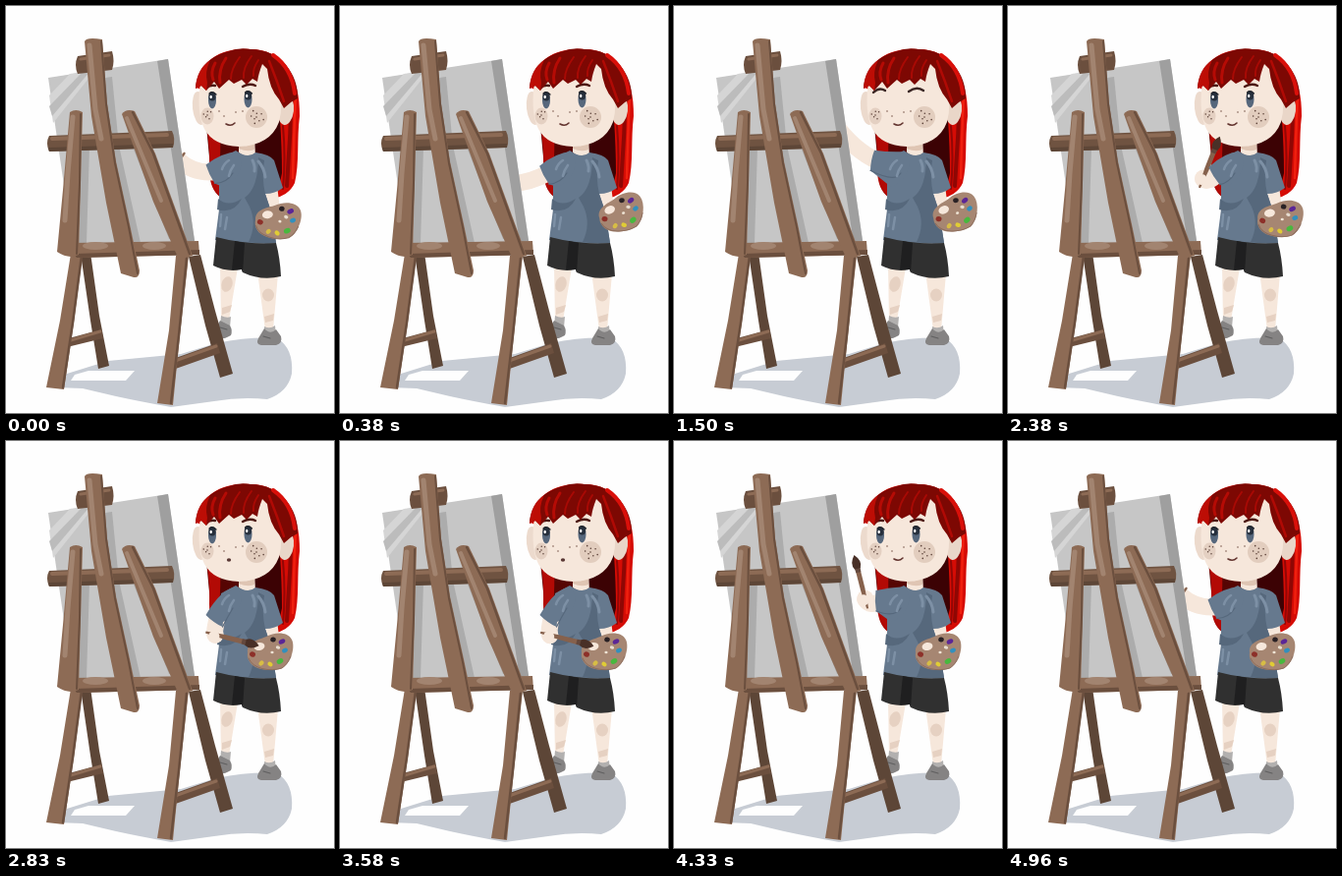
Recreate the animation shown at these times as an HTML page with a canvas. Size 334x414 px, loop 5 s.

```html
<!DOCTYPE html>
<html lang="en">
<head>
<meta charset="utf-8">
<title>Painter at the easel</title>
<style>
html, body { margin: 0; width: 100%; height: 100%; overflow: hidden; background: #fefefe; }
canvas { display: block; width: 334px; height: 414px; }
</style>
</head>
<body>
<canvas id="stage" width="334" height="414"></canvas>
<script>
const ctx = document.getElementById('stage').getContext('2d');
const LOOP = 5000, STEP = 1000 / 24, RAD = Math.PI / 180;
const PAPER = '#fefefe', SKIN = '#f6e7db', BLUSH = '#e6d1c2';
const SHIRT = '#66798e', FOLD = '#56687c', SHEEN = '#7d90a5';
const WOOD = '#8d6b55', BARK = '#6b4f3e', DARK = '#5d4637', GLOW = '#a28470', INK = '#3b2624';

function fill(color, d) {
  ctx.fillStyle = color;
  ctx.fill(new Path2D(d));
}

function line(color, width, d) {
  ctx.strokeStyle = color;
  ctx.lineWidth = width;
  ctx.lineCap = ctx.lineJoin = 'round';
  ctx.stroke(new Path2D(d));
}

function oval(color, x, y, rx, ry = rx, turn = 0) {
  ctx.fillStyle = color;
  ctx.beginPath();
  ctx.ellipse(x, y, rx, ry, turn, 0, 7);
  ctx.fill();
}

// Slope of value n at key i: smooth through a sweep, flat at turns and holds.
function slope(keys, i, n) {
  if (!keys[i - 1] || !keys[i + 1]) return 0;
  const rate = j => (keys[j + 1][n] - keys[j][n]) / (keys[j + 1][0] - keys[j][0]);
  const before = rate(i - 1), after = rate(i);
  return before * after <= 0 ? 0 : 2 * before * after / (before + after);
}

// Pose on a cubic through the keys; each key is [time, ...values].
function pose(keys, t) {
  const i = keys.findIndex(k => k[0] > t) - 1;
  if (i < 0) return keys[keys.length - 1].slice(1);
  const a = keys[i], b = keys[i + 1], span = b[0] - a[0];
  const u = (t - a[0]) / span, v = 1 - u;
  return a.slice(1).map((_, j) => {
    const n = j + 1;
    return v * v * (1 + 2 * u) * a[n] + u * u * (3 - 2 * u) * b[n]
      + span * u * v * (v * slope(keys, i, n) - u * slope(keys, i + 1, n));
  });
}

// cuff x, y, hand x, y, brush angle
const armKeys = [
  [0, 208, 171, 176, 157, -232],
  [380, 208, 172, 169, 180, -185],
  [620, 210, 174, 171, 186, -180],
  [1080, 202, 158, 165, 128, -180],
  [1500, 202, 157, 163, 119, -180],
  [1630, 202, 157, 163, 118, -180],
  [2040, 202, 157, 163, 118, -180],
  [2210, 204, 163, 177, 148, -120],
  [2380, 210, 173, 199, 176, -67],
  [2560, 211, 178, 208, 186, -30],
  [2790, 212, 183, 213, 197, 14],
  [3670, 212, 183, 213, 197, 14],
  [3900, 212, 180, 211, 189, -25],
  [4170, 210, 173, 203, 174, -80],
  [4330, 205, 161, 192, 159, -113],
  [4630, 206, 167, 174, 159, -205],
  [4750, 206, 167, 174, 159, -205],
  [4960, 208, 171, 176, 157, -232]
];

// centre x, y, tilt
const paletteKeys = [
  [-170, 269, 214, 0],
  [0, 277, 218, 4],
  [260, 286.5, 210, -12],
  [2200, 286.5, 210, -12],
  [2380, 277, 216, 2],
  [2540, 269, 214, 0]
];

function drawShadow() {
  fill('#c7ccd4', 'M50 388L62 374L104 361L178 354L214 343Q250 336 276 338Q293 348 291 374Q287 393 266 400Q240 397 212 402L168 408Q135 402 112 397L78 389Z');
  fill(PAPER, 'M70 375L84 371L131 371L122 381L66 381Z');
}

function drawHairBack() {
  fill('#560503', 'M204 122L270 118L278 182Q262 192 240 196L218 194Q207 186 208 164Z');
  fill('#b20a05', 'M204 122Q208 145 207 166Q207 186 218 194Q221 190 217 170Q219 145 218 130Z');
  fill('#d50c05', 'M194 83C197 53 222 42 249 44C282 44 300 72 299 112C296 135 299 160 294 180Q288 193 271 196Q278 182 277 160L276 118Z');
  fill('#3c0204', 'M238 140L279 116Q281 145 281 170Q278 188 270 195L259 176Z');
  line('#8f0704', 4, 'M291 77Q290 130 286 183');
  line('#f0200f', 2.5, 'M295 88Q293 135 292 175');
  line('#920605', 2, 'M282 122Q285 154 282 186');
}

function drawLegs() {
  fill(SKIN, 'M218 263L236 266L227 320L219 320ZM256 270L277 272L272 330L264 330Z');
  oval(BLUSH, 225, 283, 5.5, 8, .3);
  oval(BLUSH, 267, 294, 6, 6.5);
  fill(BLUSH, 'M220 307L230 304L228 311L220 314ZM263 316L273 313L272 320L264 322Z');
  fill('#b2b0af', 'M219 315Q225 318 229 316L228 327L218 326ZM263 326Q269 329 274 325L275 336L263 336Z');
  fill('#858383', 'M218 320Q210 332 213 337Q219 341 229 335Q231 330 228 325ZM263 328L257 338Q254 344 260 345L275 345Q282 343 280 336L275 329Q269 335 263 328Z');
  line('#605f60', 1.2, 'M218 327L225 329M262 336L269 338');
}

function drawShorts() {
  fill('#303030', 'M214 235Q244 243 275 241Q279 256 280 275Q260 280 241 271L240 268Q225 271 211 264Z');
  fill('#1f1f20', 'M233 239L243 241L241 271L240 268L230 268Z');
}

function drawBody() {
  fill(SKIN, 'M237 132H253L254 153Q247 158 237 149Z');
  fill('#dfc5b3', 'M237 140Q246 145 253 139L253 146Q246 149 237 145Z');
  fill(SKIN, 'M264 184L276 182L279 207Q273 213 266 207Z');
  fill(SHIRT, 'M234 147Q246 156 254 149Q269 151 273 157L282 185Q274 191 264 191L270 209L275 241Q244 243 213 238L217 207L217 177L219 155Z');
  fill(FOLD, 'M257 154L263 157Q260 174 264 191L270 209L275 241Q262 243 247 240Q256 222 248 204L243 195Q257 185 257 154Z');
  fill(FOLD, 'M216 196Q226 205 240 196Q232 212 215 207Z');
  line(SHEEN, 3, 'M257 158Q263 165 264 174M251 157Q254 163 253 168');
  line(SHEEN, 2.5, 'M219 212L218 224M225 215L223 227');
}

function drawEye(x, y) {
  oval('#56677c', x, y, 4, 8.5);
  oval('#27303d', x, y - 4, 3.7, 4.5);
  oval('#fff', x - 1.3, y - 3.5, 1.2, 1.8);
  line('#1d2027', 1.2, `M${x - 3} ${y - 7}Q${x} ${y - 10} ${x + 4} ${y - 6}`);
}

function drawFace(blink, talk) {
  oval('#e9d6c8', 285, 106, 8, 15, .12);
  oval('#ecdacd', 197, 104, 7, 17, -.12);
  fill(SKIN, 'M198 78C196 91 195 112 202 125Q211 142 237 143Q269 142 278 118Q283 101 277 77L263 55L218 59Z');
  oval('#e2cdbe', 255, 113, 11);
  oval('#e4d0c2', 205, 112, 6.5, 8.5);
  for (let i = 0; i < 9; i++) {
    const a = i * 2.4, r = 2.7 * Math.sqrt(i);
    oval('#5b4037', 255 + r * Math.cos(a), 113 + r * Math.sin(a), .8);
    if (i < 6) oval('#5b4037', 205 + .7 * r * Math.cos(a), 111 + r * Math.sin(a), .75);
  }
  [[217, 107], [222, 112], [234, 108], [241, 107]].forEach(p => oval('#7a594c', ...p, .8));
  if (blink) {
    line(INK, 2.4, 'M203 88Q209 82 215 86M239 87Q247 81 254 86');
  } else {
    drawEye(210, 96);
    drawEye(246.5, 95);
    line('#4c150f', 2.4, 'M204 83Q208 80 213 81M241 82Q248 78 254 81');
  }
  if (talk) oval('#583633', 227, 121, 2.2, 1.7);
  else line('#63342f', 1.6, 'M224 120Q229 123 233 119');
}

function drawFringe() {
  fill('#7d0803', 'M193 84C194 64 207 51 227 46Q237 42 249 44C280 44 298 70 297 94L290 98L283 104L278 95Q268 84 266 64L261 59Q257 69 256 77L251 74L245 80L240 75L232 79L227 75L217 84L212 77L204 86L199 81Z');
  fill('#bd0d05', 'M193 84C194 70 199 61 208 55Q202 67 205 78L204 86L199 81Z');
  line('#b50b05', 3, 'M213 58Q208 67 211 75M224 53Q216 65 218 78');
  line('#a80a05', 2, 'M238 52Q229 64 229 74M250 51Q241 63 242 73M257 55Q251 64 252 71');
  line('#d9100a', 4, 'M272 50Q291 63 294 89');
  line('#b00a05', 2.5, 'M268 56Q276 76 283 97');
}

function drawPalette([x, y, tilt]) {
  ctx.save();
  ctx.translate(x, y);
  ctx.rotate(tilt * RAD);
  fill('#a68672', 'M-23 1C-24 -10 -11 -12 -4 -15C5 -20 18 -20 22 -12C26 -4 21 12 12 17C2 21 -15 19 -20 12Q-24 7 -23 1Z');
  line('#8d6d5c', 1, 'M-22 7C-18 18 0 21 12 17Q18 13 21 5');
  oval('#8d3029', -18, 3, 3, 2.6, .4);
  oval('#d7bd45', -9, 12, 2.8, 2.2, -.8);
  oval('#e0cc35', 0, 13, 2.8, 2.2, .6);
  oval('#48b83e', 10, 10, 3.5, 2.6, -.5);
  oval('#3290bd', 15, -1, 3, 2.3, -.5);
  oval('#5b2696', 12, -10, 3.5, 2.4, -.5);
  oval('#292124', 3, -12, 2.8, 2.5, .2);
  oval('#e7ddd0', 8, -4, 2.2, 1.7, .3);
  oval('#efe4d5', 2, 1, 1.6, 1.3);
  oval(SKIN, -11, -5, 5.5, 4, -.2);
  ctx.restore();
}

function drawBrush(x, y, angle) {
  ctx.save();
  ctx.translate(x, y);
  ctx.rotate(angle * RAD);
  fill('#86614c', 'M-10 -1Q10 -3 30 -2.5L30 2.5Q10 3 -10 1Z');
  fill('#63483d', 'M28 -2.5L33 -3V3L28 2.5Z');
  fill('#493027', 'M32 -3Q38 -7 46 0Q38 7 32 3Z');
  ctx.restore();
}

function drawArm([cx, cy, hx, hy, angle]) {
  const dx = cx - 227, dy = cy - 162, len = Math.hypot(dx, dy);
  const nx = -dy / len * 10.5, ny = dx / len * 10.5;
  const top = `${cx + nx} ${cy + ny}`, low = `${cx - nx} ${cy - ny}`;
  const sx = cx - dx * .25, sy = cy - dy * .25;
  line(SKIN, 17, `M${sx} ${sy}Q${(sx + hx) / 2 - 3} ${(sy + hy) / 2 + 8} ${hx} ${hy}`);
  oval(SKIN, hx, hy, 8.5, 9);
  drawBrush(hx, hy, angle);
  oval(SKIN, hx - 1, hy + 1, 5.5, 4.5, angle * RAD);
  fill(SHIRT, `M236 148Q220 149 ${top}Q${cx + dx * .07} ${cy + dy * .07} ${low}L221 184Q236 180 240 160Z`);
  line(FOLD, 1.2, `M${low}Q225 180 231 170`);
  line(SHEEN, 2.6, 'M227 157Q222 160 220 166M232 162Q228 167 227 173');
}

function drawEasel() {
  fill(DARK, 'M76 252L86 251L95 315L105 366L94 369L86 320ZM186 255L198 253L213 310L231 374L218 378L203 325Z');
  fill(BARK, 'M64 338L97 329L99 338L62 347ZM170 359L215 343L218 353L167 371Z');
  line(WOOD, 3, 'M66 340L96 331M172 361L214 346');
  fill(WOOD, 'M66 252L78 252L69 322L59 390L41 388L55 320ZM173 254L186 254L177 335L170 406L154 404L166 330Z');
  line(BARK, 2.5, 'M77 254L68 322L58 388M184 256L176 335L168 404');

  fill('#c6c6c6', 'M43 73L165 54L192 238L190 243L68 244Z');
  fill('#d5d5d5', 'M44 91L65 69L91 65L48 119Z');
  fill('#bcbcbc', 'M44 102L78 67L86 66L47 112Z');
  fill('#9f9f9f', 'M154 56L165 54L192 239L183 241Z');
  fill('#acacac', 'M101 73L108 72L115 142L137 241L126 241L105 145ZM77 145L85 144L82 241L74 241ZM130 146L138 145L173 237L166 237Z');

  fill(WOOD, 'M66 241L196 239L197 253L72 256Z');
  fill(BARK, 'M69 252L197 248L197 253L72 256Z');
  oval(GLOW, 91, 244, 13, 4);
  oval(GLOW, 151, 244, 12, 4);

  fill('#6f5341', 'M44 132L169 127Q173 135 170 144L44 148Q40 139 44 132Z');
  line(WOOD, 4, 'M47 135L164 131');
  fill(DARK, 'M43 144L170 140L170 144L44 148Z');
  fill(BARK, 'M73 51L108 46Q111 56 108 65L73 69Q69 60 73 51Z');
  line(WOOD, 3, 'M76 54L105 50');

  fill(WOOD, 'M80 36Q82 31 98 34L103 99L112 158L126 222L136 269Q136 277 130 276L117 272L102 200L87 112Z');
  line(BARK, 2, 'M97 36L102 100L111 160L125 225L134 272');
  line(GLOW, 5, 'M85 40L91 105L97 135');

  fill(WOOD, 'M65 108Q71 104 78 108L76 180L74 253Q64 258 52 250L58 187Z');
  line(BARK, 2, 'M76 110L75 180L72 252');
  line(GLOW, 5, 'M68 113L63 170L60 218');

  fill(WOOD, 'M118 110Q122 104 131 107L152 150L190 254L176 258L150 199Z');
  line(BARK, 2.5, 'M129 108L150 150L187 252');
  line(GLOW, 4, 'M123 114L140 155L158 198');
}

function render(now) {
  const t = Math.floor((now % LOOP) / STEP + .05) * STEP;
  const arm = pose(armKeys, t);
  // Two dabs of the brush in the paint.
  if (t > 2790 && t < 3580) {
    const stir = (1 - Math.cos((t - 2790) / 790 * 4 * Math.PI)) / 2;
    arm[2] += 9 * stir;
    arm[3] += 3 * stir;
    arm[4] += 4 * stir;
  }
  ctx.fillStyle = PAPER;
  ctx.fillRect(0, 0, 334, 414);
  drawShadow();
  drawHairBack();
  drawLegs();
  drawBody();
  drawShorts();
  drawFace(t > 1250 && t < 1570, t > 2700 && t < 3900);
  drawFringe();
  drawPalette(pose(paletteKeys, t));
  drawArm(arm);
  drawEasel();
}

const start = performance.now();
function tick() {
  render(performance.now() - start);
  requestAnimationFrame(tick);
}
tick();
</script>
</body>
</html>
```
